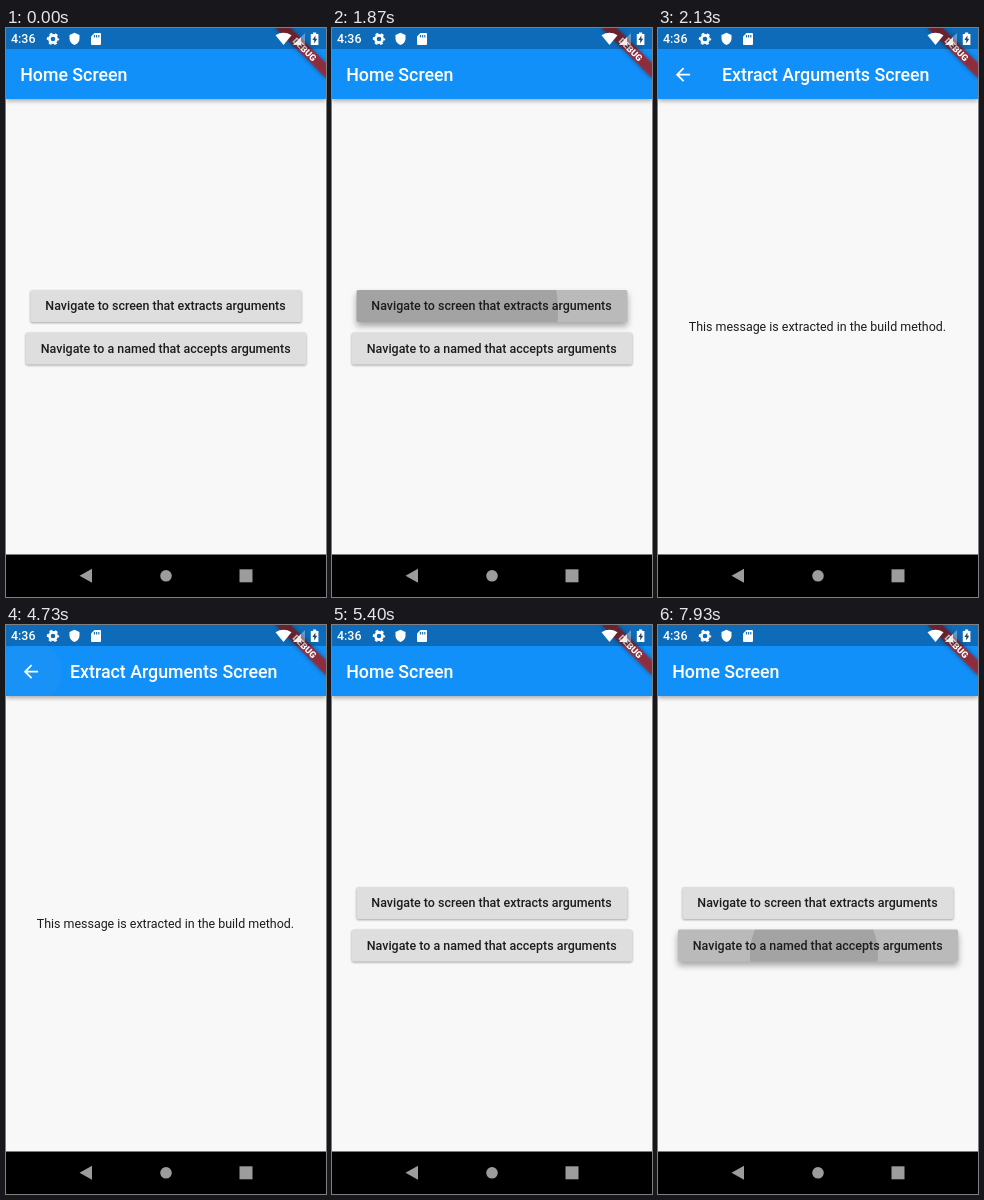
Animation of 320 by 569 pixels, one loop 8000 ms. Source, as an HTML page:

```html
<!DOCTYPE html>
<html lang="en">
<head>
<meta charset="utf-8">
<title>Passing arguments</title>
<style>
  html, body { margin: 0; height: 100%; overflow: hidden; background: #000; }
  svg { display: block; width: 100%; height: 100%; font: 500 12.44px Roboto, sans-serif; }
  .title { font-size: 17.78px; fill: #fff; }
  .label { text-anchor: middle; fill: #1c1c1c; }
  .bar { fill: #1290f9; filter: drop-shadow(0 2px 2px rgba(0, 0, 0, .32)); }
  .face { fill: #dedede; }
</style>
</head>
<body>
<svg viewBox="0 0 320 569">
  <defs>
    <clipPath id="clip1"><rect x="24.5" y="262" width="271" height="32" rx="1.8"/></clipPath>
    <clipPath id="clip2"><rect x="19.8" y="304.5" width="280.4" height="32" rx="1.8"/></clipPath>
    <clipPath id="clipBack"><circle cx="25" cy="47" r="31"/></clipPath>
  </defs>

  <g id="home">
    <rect width="320" height="527" fill="#f8f8f8"/>
    <rect class="bar" width="320" height="71"/>
    <text class="title" x="14.2" y="53.3">Home Screen</text>
    <g id="button1">
      <rect class="face" x="24.5" y="262" width="271" height="32" rx="1.8"/>
      <g clip-path="url(#clip1)">
        <rect class="glow" x="24" y="261" width="272" height="34"/>
        <circle class="splash" cx="95" cy="283"/>
      </g>
      <text class="label" x="159.5" y="282.3">Navigate to screen that extracts arguments</text>
    </g>
    <g id="button2">
      <rect class="face" x="19.8" y="304.5" width="280.4" height="32" rx="1.8"/>
      <g clip-path="url(#clip2)">
        <rect class="glow" x="19" y="304" width="282" height="34"/>
        <circle class="splash" cx="156" cy="329"/>
      </g>
      <text class="label" x="159.7" y="324.8">Navigate to a named that accepts arguments</text>
    </g>
  </g>

  <g id="page">
    <rect width="320" height="527" fill="#f8f8f8"/>
    <rect class="bar" width="320" height="71"/>
    <g id="back">
      <g clip-path="url(#clipBack)">
        <rect class="glow" y="16" width="56" height="55" fill="#bcbcbc"/>
        <circle class="splash" cx="25" cy="47" fill="#c8c8c8"/>
      </g>
      <path transform="translate(14.3 36) scale(.889)" fill="#fff"
        d="M20 11H7.83l5.59-5.59L12 4l-8 8 8 8 1.41-1.41L7.83 13H20z"/>
    </g>
    <text class="title" x="64" y="53.3">Extract Arguments Screen</text>
    <text class="label" x="159.4" y="303.3" font-weight="400">This message is extracted in the build method.</text>
  </g>

  <g transform="translate(320 0) rotate(45)">
    <rect x="-35.6" y="24.9" width="71.2" height="10.7" fill="#b71c1c" fill-opacity=".75"
      style="filter: drop-shadow(0 0 2.5px rgba(0, 0, 0, .5))"/>
    <text y="33.5" text-anchor="middle" font-size="9.07" font-weight="900" fill="#fff">DEBUG</text>
  </g>

  <g id="status" fill="#fff">
    <rect width="320" height="21" fill="#000" opacity=".26"/>
    <text x="5" y="15.4">4:36</text>
    <g fill="none" stroke="#fff">
      <circle cx="47" cy="11" r="3.6" stroke-width="2.6"/>
      <circle cx="47" cy="11" r="5.3" stroke-width="1.8" stroke-dasharray="2.8 2.75" stroke-dashoffset="1.4"/>
    </g>
    <path d="M68.5 4.8l5 2.2v3.6c0 3-2 5.4-5 6.4c-3-1-5-3.4-5-6.4V7z"/>
    <path d="M88.5 5H94q1 0 1 1v10q0 1-1 1H86q-1 0-1-1V8.5z"/>
    <path d="M88.4 7v2.5m2.2-2.5v2.5m2.2-2.5v2.5" stroke="#0e6bb8" stroke-width="1.1"/>
    <path d="M277.5 17L269.5 7.2Q277.5 2.3 285.5 7.2z"/>
    <path d="M299 5V17H287z" opacity=".35"/>
    <path d="M287 17l8-8v8z" opacity=".8"/>
    <path d="M307 4.6h3.2v1.3h2.2V17h-7.6V5.9h2.2z"/>
    <path d="M309.4 7.4l-3 4.6h1.8v3.4l3-4.6h-1.8z" fill="#2b4560"/>
  </g>

  <rect y="526.5" width="320" height="43"/>
  <g fill="#9c9c9c">
    <path d="M73.5 547.8L86 540.8V554.8z"/>
    <circle cx="160" cy="547.8" r="5.8"/>
    <rect x="233.5" y="541.3" width="13" height="13"/>
  </g>
</svg>
<script>
const LOOP = 8000, FPS = 15;
const $ = id => document.getElementById(id);
const clamp = v => Math.max(0, Math.min(1, v));

function bezier(x1, y1, x2, y2) {
  const at = (a, b, u) => 3 * a * u * (1 - u) ** 2 + 3 * b * u * u * (1 - u) + u ** 3;
  return x => {
    if (x <= 0 || x >= 1) return clamp(x);
    let lo = 0, hi = 1;
    for (let i = 0; i < 24; i++) {
      const mid = (lo + hi) / 2;
      if (at(x1, x2, mid) < x) lo = mid; else hi = mid;
    }
    return at(y1, y2, lo);
  };
}
const slide = bezier(.4, 0, .2, 1);
const fade = bezier(.42, 0, 1, 1);

// Touch feedback: the splash grows slowly while held, fast once released.
const touches = [
  { id: 'button1', down: 1116, up: 1867, speed: .1745, glow: .16, splash: .12 },
  { id: 'button2', down: 7450, up: Infinity, speed: .1325, glow: .16, splash: .12 },
  { id: 'back', down: 4716, up: 5100, speed: .028, glow: .4, splash: .4 }
].map(touch => {
  const find = name => $(touch.id).querySelector('.' + name);
  return { ...touch, face: find('face'), glowEl: find('glow'), splashEl: find('splash') };
});

function drawTouch(touch, t) {
  const age = t - touch.down;
  const left = age < 0 ? 0 : clamp(1 - (t - touch.up) / 200);
  const press = clamp(age / 200) * left;
  touch.glowEl.setAttribute('opacity', touch.glow * press);
  touch.splashEl.setAttribute('opacity', touch.splash * left);
  touch.splashEl.setAttribute('r', Math.max(0, age * touch.speed) + Math.max(0, t - touch.up));
  if (touch.face) {
    const y = 1.2 + 3 * press, blur = 1 + 2.2 * press;
    touch.face.style.filter = `drop-shadow(0 ${y}px ${blur}px rgba(0, 0, 0, .34))`;
  }
}

function draw(now) {
  const step = Math.min(LOOP * FPS / 1000 - 1, Math.floor(now % LOOP * FPS / 1000 + .051));
  const t = step * 1000 / FPS;
  touches.forEach(touch => drawTouch(touch, t));

  const shown = t < 4000 ? clamp((t - 1867) / 266) : clamp(1 - (t - 5100) / 300);
  $('page').setAttribute('opacity', fade(shown));
  $('page').setAttribute('transform', `translate(0 ${132 * (1 - slide(shown))})`);
}

const start = performance.now();
function tick() {
  draw(performance.now() - start);
  requestAnimationFrame(tick);
}
tick();
</script>
</body>
</html>
```
